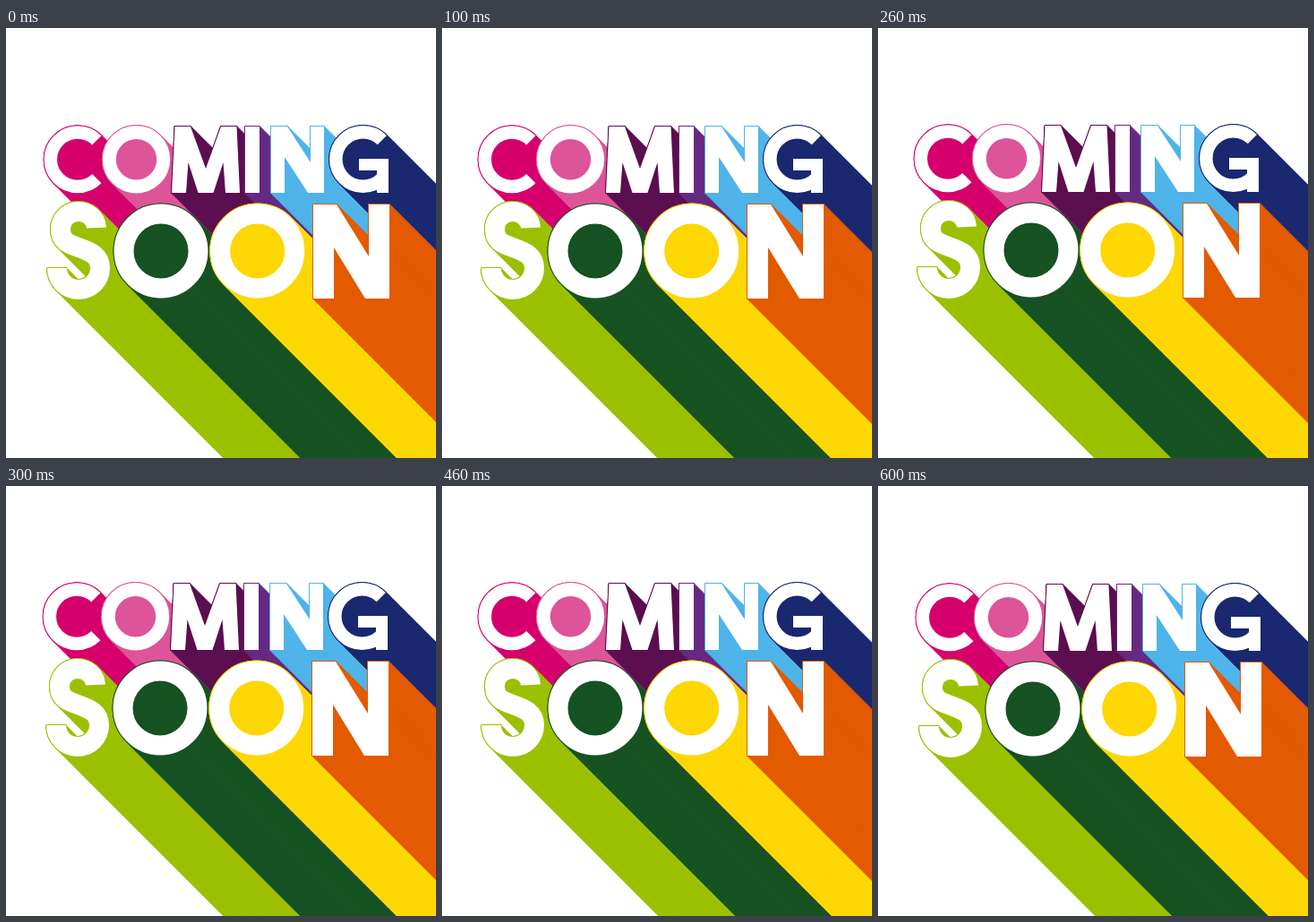
An HTML page with a canvas that plays this animation: 480 px wide and 480 px high, repeating every 700 ms.

```html
<!DOCTYPE html>
<html lang="en">
<head>
<meta charset="utf-8">
<title>Coming soon</title>
<style>
  html, body { margin: 0; width: 100%; height: 100%; overflow: hidden; background: #fff; }
  canvas { display: block; }
</style>
</head>
<body>
<canvas width="480" height="480" role="img" aria-label="Coming soon"></canvas>
<script>
const stage = document.querySelector('canvas').getContext('2d');

// The lettering is drawn once, with a margin to spare for the shake
const art = document.createElement('canvas');
art.width = art.height = 490;
const ctx = art.getContext('2d');

const ring = (x, y, r) => `M${x - r},${y}a${r},${r} 0 1 1 ${2 * r},0a${r},${r} 0 1 1 ${-2 * r},0Z`;

// Open bowl of C and G, cut at 45 degrees top and bottom
const bowl = (x, y, r) => {
  const d = r * Math.SQRT1_2;
  return `M${x + d},${y - d}A${r},${r} 0 1 0 ${x + d},${y + d}`;
};

// Each letter: colour, stroked path and its width, filled polygon
const letters = [
  { color: '#d6006d', line: bowl(80, 146.7, 30.2), width: 14.5 },
  { color: '#dd5599', line: ring(145.5, 146.7, 30.2), width: 15 },
  { color: '#5c0f50', shape: 'M185,184L188.5,110H206L223,157L240,110H257.5L261,184H245L242.5,150L231.5,184H214.5L203.5,150L201,184Z' },
  { color: '#662a82', shape: 'M267,110H283V184H267Z' },
  { color: '#4fb4e9', shape: 'M296,184V110H314L340,150V110H355V184H337L311,144V184Z' },
  { color: '#1a2870', line: bowl(398.5, 146.5, 30.2), width: 14.5, shape: 'M394,146H427V184H414V159H394Z' },
  {
    color: '#9bc000', width: 22,
    line: 'M101,223A20,19 0 0 0 61,225C61,238 70,241 81,245' +
          'C94,249.5 105,254 105,268A24,24 0 0 1 57,268'
  },
  { color: '#175223', line: ring(173, 249, 41.5), width: 22 },
  { color: '#fdd704', line: ring(280.7, 249, 41.5), width: 22 },
  { color: '#e35b00', shape: 'M343,302V197H369L405,255V197H428V302H401L366,245V302Z' }
];

function stamp({ line, width, shape }, color, dx, dy, grow) {
  ctx.setTransform(1, 0, 0, 1, dx, dy);
  ctx.fillStyle = ctx.strokeStyle = color;
  if (line) {
    ctx.lineWidth = width + 2 * grow;
    ctx.stroke(new Path2D(line));
  }
  if (shape) {
    const path = new Path2D(shape);
    ctx.fill(path);
    if (grow) {
      ctx.lineWidth = 2 * grow;
      ctx.stroke(path);
    }
  }
}

for (const letter of letters) {
  for (let k = 440; k >= 0; k--) stamp(letter, letter.color, k, k, 0.8);
  // Outline the stroke ends too
  for (let a = 0; a < 8; a++) {
    stamp(letter, letter.color, Math.cos(a * Math.PI / 4), Math.sin(a * Math.PI / 4), 0);
  }
  stamp(letter, '#fff', 0, 0, 0);
}

// The shake walks out along these offsets and back again
const offsets = [[0, 0], [-2, 0], [-2, -1], [-1, -1]];

function frame() {
  const step = Math.floor(performance.now() % 700 / 100);
  const [x, y] = offsets[Math.min(step, 6 - step)];
  stage.clearRect(0, 0, 480, 480);
  stage.drawImage(art, x, y);
  requestAnimationFrame(frame);
}
frame();
</script>
</body>
</html>
```
